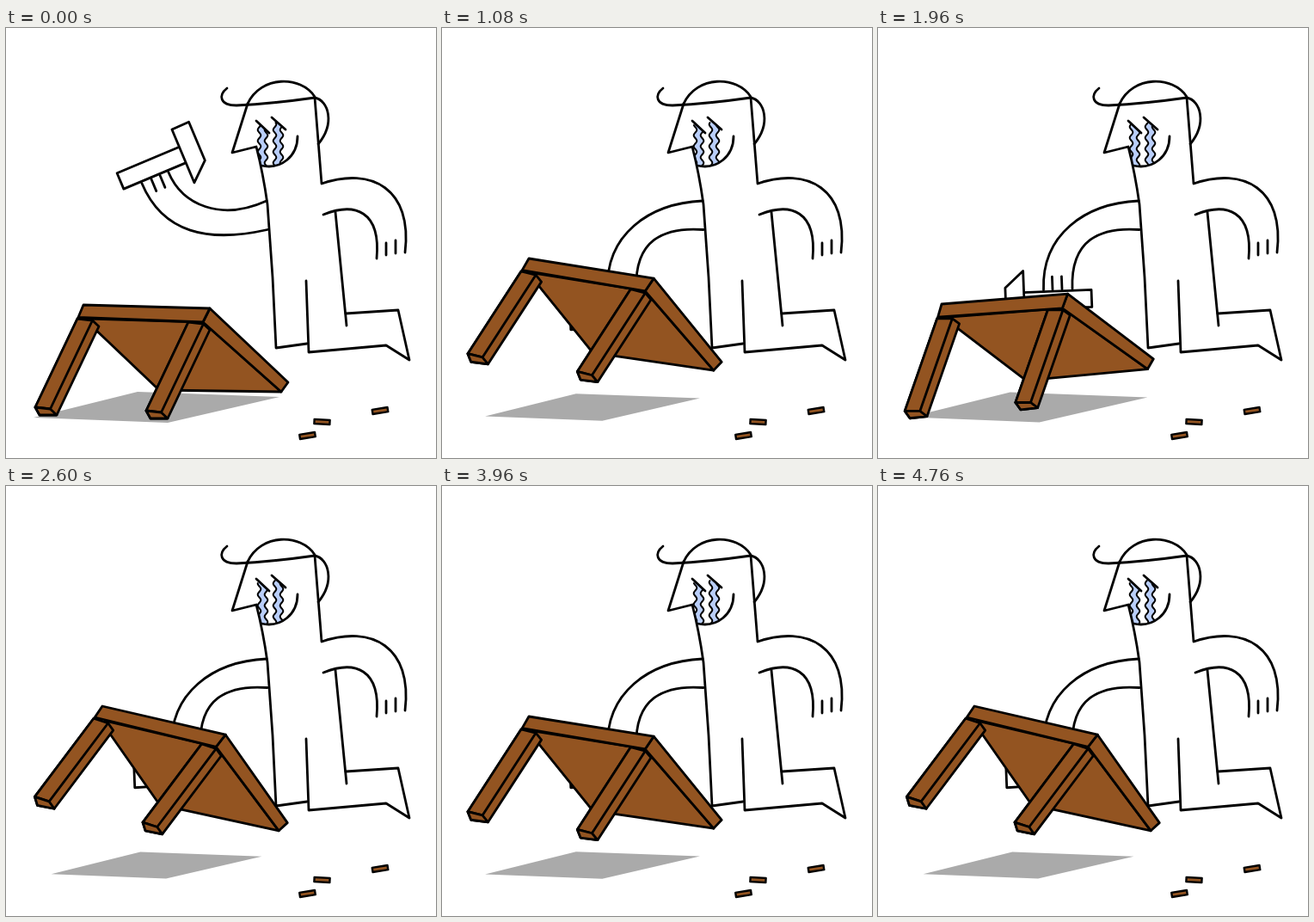
Write an HTML page with a canvas that moves like this. It is 500 px wide and 500 px high and loops after 4.8 s.

```html
<!DOCTYPE html>
<html>
<head>
<meta charset="utf-8">
<style>
html, body { margin: 0; width: 100%; height: 100%; overflow: hidden; background: #fff; }
canvas { display: block; width: 500px; height: 500px; }
</style>
</head>
<body>
<canvas id="stage" width="500" height="500"></canvas>
<script>
const ctx = document.getElementById('stage').getContext('2d');
const BROWN = '#935421', SHADOW = '#aaaaaa', TEAR = '#b9cefa';
const FRAME_MS = 40, LOOP_FRAMES = 120, CYCLE_FRAMES = 18;
const HIT_BEAT = 3, LIFT_BEAT = 7, BEATS = 9;
const RAD = Math.PI / 180;
const LINE = 2.8;

const lerp = (a, b, u) => a + (b - a) * u;

// Table poses on the beats after the hit: shift x, shift y, tilt in degrees.
const REST = [0, 0, 0];
const HOP = [[11, -54, 7.5], [22, -66, 11.5], [-16, -1, -6.2], [4.5, -2, 2]];

function poly(points, fill, stroke = true) {
  ctx.beginPath();
  points.forEach(p => ctx.lineTo(p[0], p[1]));
  ctx.closePath();
  ctx.fillStyle = fill;
  ctx.fill();
  if (stroke) ctx.stroke();
}

function line(d) {
  ctx.stroke(new Path2D(d));
}

// Runs a drawing in a moved and turned coordinate system.
function placed(x, y, degrees, paint) {
  ctx.save();
  ctx.translate(x, y);
  ctx.rotate(degrees * RAD);
  paint();
  ctx.restore();
}

function drawTear(cx, top, flow) {
  const bottom = 161, wavelength = 12.8;
  const edge = offset => {
    const points = [];
    for (let y = top; y <= bottom; y++) {
      points.push([cx + offset + 1.8 * Math.sin((y / wavelength - flow) * 2 * Math.PI), y]);
    }
    return points;
  };
  const left = edge(-4), right = edge(4);
  poly([...left, ...[...right].reverse()], TEAR, false);
  ctx.lineWidth = 2;
  for (const side of [left, right]) {
    ctx.beginPath();
    side.forEach(p => ctx.lineTo(p[0], p[1]));
    ctx.stroke();
  }
  ctx.lineWidth = LINE;
}

function drawPerson(frame) {
  const flow = frame / CYCLE_FRAMES + 0.5;
  ctx.save();
  ctx.clip(new Path2D('M290 108 L306 122 L309 104 L325 118 L340 126 C340 150 320 165 297 160 L291 138Z'));
  drawTear(298.5, 113, flow);
  drawTear(316.5, 110, flow);
  ctx.restore();

  // Head
  line('M257 70 C247 78 248 90 268 90 Q310 88 359 81');
  line('M281 88 C296 55 343 55 359 80');
  line('M359 81 C375 84 383 111 363 135');
  line('M291 108 L306 122 M309 104 L325 118');
  line('M339 126 C339 149 320 165 297 160');
  // Body
  line('M281 88 L263 145 L291 138 Q299 169 304 205 L310 290 L314 372 L350 367');
  line('M359 81 L367 181 C425 161 473 187 464 261');
  line('M369 217 C406 202 436 213 431 268');
  line('M442 250 L442 264 M453 247 L453 262');
  line('M383 214 L396 346');
  line('M349 294 L352 377 L442 369 L469 386 L456 328 L395 332');
}

function drawHammerArm(beat) {
  // Raised, then down in one beat, then lifted evenly back along an arc.
  const windUp = beat < HIT_BEAT ? beat : 0;
  const u = beat < HIT_BEAT ? 0 : beat < LIFT_BEAT ? 1 : (BEATS - beat) / 3;
  const x = lerp(174.5, 208, u) - 48 * Math.sin(Math.PI * u) + 2.5 * windUp;
  const y = lerp(173.5, 304, u) - 5 * windUp;
  const turn = (lerp(-22.8, -182.2, u) + 2 * windUp) * RAD;
  const cos = Math.cos(turn), sin = Math.sin(turn);
  const at = (px, py) => [x + px * cos - py * sin, y + px * sin + py * cos];

  ctx.beginPath();
  ctx.moveTo(303, 201);
  ctx.bezierCurveTo(lerp(250, 240, u), lerp(225, 204, u), ...at(15.5, lerp(42, 64, u)), ...at(15.5, 0));
  ctx.moveTo(304, 234.5);
  ctx.bezierCurveTo(lerp(235, 258, u), lerp(250, 231, u), ...at(-18, lerp(63, 57, u)), ...at(-18, 0));
  for (const finger of [-6, 5]) {
    ctx.moveTo(...at(finger, 0));
    ctx.lineTo(...at(finger, 15));
  }
  ctx.stroke();

  poly([at(-40, -2), at(-40, -22), at(40, -22), at(40, -2)], '#fff');
  poly([at(38.5, -44), at(60, -44.5), at(60, 4), at(38.5, 23)], '#fff');
}

function drawLeg(dx, dy) {
  const foot = [[34, 441], [51.5, 443], [59, 450], [39, 450]].map(([x, y]) => [x + dx, y + dy]);
  const [left, middle, right, front] = foot;
  const top = ([x, y]) => [x + 49, y - 103];
  poly([top(left), top(middle), top(right), right, front, left], BROWN);
  poly([top(left), top(middle), middle, left], BROWN);
  poly([left, middle, right, front], BROWN);
}

function drawTable(beat) {
  const [dx, dy, tilt] = HOP[beat - HIT_BEAT - 1] || REST;

  // The shadow shrinks as the middle of the table rises.
  const height = Math.max(0, -dy - 90 * Math.sin(tilt * RAD));
  const size = 1 - 0.003 * height;
  const shadow = [[-143, 12], [-22, -18], [143, -12], [13, 18]];
  poly(shadow.map(([x, y]) => [175 + x * size, 441 + y * size]), SHADOW, false);

  placed(90 + dx, 322 + dy, tilt, () => {
    ctx.translate(-90, -322);
    poly([[97, 338], [229, 342], [320, 423], [178, 421], [97, 344]], BROWN);
    poly([[237, 326], [328, 412], [320, 423], [229, 342]], BROWN);
    drawLeg(0, 0);
    drawLeg(129, 4);
    poly([[90, 322], [237, 326], [229, 342], [84, 336.5]], BROWN);
  });
}

function drawChip(x, y, tilt) {
  ctx.lineWidth = 2.4;
  placed(x, y, tilt, () => poly([[-9, -2.6], [9, -2.6], [9, 2.6], [-9, 2.6]], BROWN));
}

function draw(now) {
  const frame = Math.floor(now / FRAME_MS) % LOOP_FRAMES;
  const beat = Math.floor(frame % CYCLE_FRAMES / 2);
  ctx.fillStyle = '#fff';
  ctx.fillRect(0, 0, 500, 500);
  ctx.lineWidth = LINE;
  ctx.lineCap = ctx.lineJoin = 'round';
  ctx.strokeStyle = '#000';
  drawPerson(frame);
  drawHammerArm(beat);
  drawTable(beat);
  drawChip(350.5, 474, -9);
  drawChip(367.5, 458, 3);
  drawChip(435, 445, -9);
}

function tick() {
  draw(performance.now());
  requestAnimationFrame(tick);
}
tick();
</script>
</body>
</html>
```
